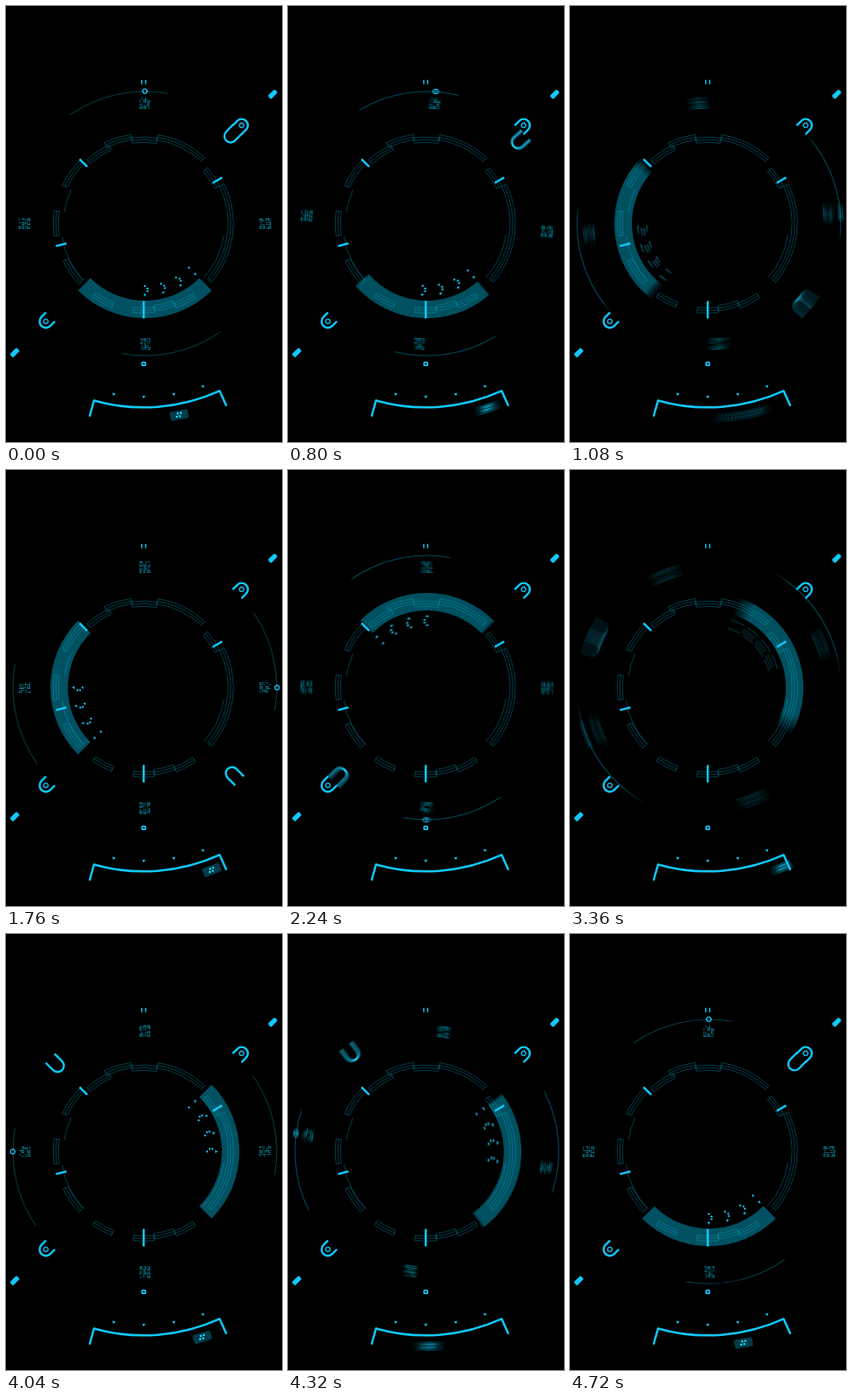
Write an HTML page with a canvas that moves like this. It is 317x500 px and loops after 4.76 s.

```html
<!DOCTYPE html>
<html>
<head>
<meta charset="utf-8">
<style>
  html, body { margin: 0; height: 100%; overflow: hidden; background: #000; }
  canvas { display: block; }
</style>
</head>
<body>
<canvas id="stage" width="317" height="500"></canvas>
<script>
const ctx = document.getElementById('stage').getContext('2d');
const LOOP = 4760, STEP = 40, SHUTTER = 20, SAMPLES = 16;
const BRIGHT = '#10c8fa', DIM = 'rgba(8,190,225,.32)', PANEL = '#025162';
const rad = deg => deg * Math.PI / 180;

// Each turn moves the dial a quarter; sweep is how far the lower badges travel.
const turns = [
  { start: 567, sweep: -190 },
  { start: 1704, sweep: 160.5 },
  { start: 2880, sweep: 22.5 },
  { start: 4040, sweep: 187 }
];

// Ring plates: from angle, to angle, outer radius.
const plates = [
  [244, 262, 103], [262, 279, 99], [279, 313, 103], [228, 246, 98], [205, 225, 103],
  [172, 188, 104], [137, 155, 102], [111, 125, 103], [83, 97, 103], [69, 83, 101],
  [55, 69, 104], [-41, -26, 97], [-26, 41, 103]
];

// Slow quartic build-up, then a damped spring that overshoots and settles.
function swing(ms) {
  if (ms < 470) return .7 * (Math.max(0, ms) / 470) ** 4;
  const u = .03 * (ms - 470);
  return 1 - Math.exp(-u) * (.3 * Math.cos(u) + .1 * Math.sin(u));
}

function pose(t) {
  let dial = 0, badge = 79.5;
  for (const { start, sweep } of turns) {
    const p = swing(t - start);
    dial += 90 * p;
    badge += sweep * p;
  }
  return { dial, badge };
}

// Draws in a frame whose x axis points outward at the given angle.
function at(deg, radius, draw) {
  ctx.save();
  ctx.rotate(rad(deg));
  ctx.translate(radius, 0);
  draw();
  ctx.restore();
}

function stroke(color, width) {
  ctx.strokeStyle = color;
  ctx.lineWidth = width;
  ctx.stroke();
}

function arc(radius, from, to, color = DIM, width = 1) {
  ctx.beginPath();
  ctx.arc(0, 0, radius, rad(from), rad(to));
  stroke(color, width);
}

function sector(inner, outer, from, to) {
  ctx.beginPath();
  ctx.arc(0, 0, outer, rad(from), rad(to));
  ctx.arc(0, 0, inner, rad(to), rad(from), true);
  ctx.closePath();
}

function box(width, height, corner, color) {
  ctx.fillStyle = color;
  ctx.beginPath();
  ctx.roundRect(-width / 2, -height / 2, width, height, corner);
  ctx.fill();
}

// U shape; side 1 opens outward, -1 inward.
function hook(side, arm) {
  ctx.beginPath();
  ctx.moveTo(side * arm, -7.2);
  ctx.lineTo(0, -7.2);
  ctx.arc(0, 0, 7.2, -Math.PI / 2, Math.PI / 2, side > 0);
  ctx.lineTo(side * arm, 7.2);
  stroke(BRIGHT, 2.4);
}

function pointer(size) {
  ctx.fillStyle = BRIGHT;
  ctx.beginPath();
  ctx.moveTo(size, 0);
  ctx.lineTo(-size * .7, -size);
  ctx.lineTo(-size * .7, size);
  ctx.fill();
}

// Two rows of three seven-segment characters.
function readout(seed) {
  const bar = (x, y, w, h) => {
    seed = seed * 16807 % 2147483647;
    if (seed % 100 < 62) ctx.fillRect(x, y, w, h);
  };
  ctx.fillStyle = 'rgba(12,185,215,.55)';
  for (let i = 0; i < 6; i++) {
    const x = -6 + i % 3 * 4.4, y = -6.3 + (i > 2 ? 7 : 0);
    for (let j = 0; j < 3; j++) bar(x, y + j * 2.5, 3, 1);
    for (let j = 0; j < 4; j++) bar(x + j % 2 * 2.2, y + (j > 1 ? 3 : 0), 1, 2.8);
  }
}

function dots(group) {
  at(90 - group * 15, 0, () => {
    ctx.fillStyle = BRIGHT;
    ctx.fillRect(70.5, -1, 2, 2);
    for (let j = 1; j < 3 && group < 3; j++) ctx.fillRect(70.5 + j * 3, -4, 2, 2);
    ctx.translate(82, 0);
    pointer(1.7);
  });
}

function drawDial(angle) {
  ctx.save();
  ctx.translate(1.3, .2);
  ctx.rotate(rad(angle));
  sector(88.5, 108.5, 45, 135);
  ctx.fillStyle = PANEL;
  ctx.fill();
  arc(151.5, 235.5, 280);
  arc(151.5, 55, 100);
  at(270, 151.8, () => arc(2.6, 0, 360, BRIGHT, 1.3));
  at(-45.5, 140.5, () => hook(1, 12));
  for (let i = 0; i < 4; i++) {
    dots(i);
    at(i * 90, 138.5, () => {
      ctx.rotate(Math.PI / 2);
      readout(4127 + i * 7919);
    });
  }
  ctx.restore();
}

// Two opposite badges, seen only between the prongs of the lower bar.
function drawBadges(angle) {
  ctx.save();
  sector(213, 236, 64.5, 106.5);
  ctx.clip();
  for (const deg of [angle, angle + 180]) {
    at(deg, 223.5, () => {
      ctx.rotate(-Math.PI / 2);
      box(21, 10.4, 2, '#033b49');
      ctx.fillStyle = BRIGHT;
      for (let j = 0; j < 4; j++) ctx.fillRect(-4 + j * 1.8, j % 2 ? -3 : .4, 2, 2);
    });
  }
  ctx.restore();
}

function drawFixed() {
  for (const [from, to, outer] of plates) {
    sector(outer - 6, outer, from, to);
    stroke(DIM, 1);
    arc(outer - 3, from, to);
  }
  arc(92, 188, 205);
  arc(95, 136, 171);
  arc(93, 8, 42);

  for (const deg of [165.5, 225, -30.3]) at(deg, 98, () => box(12.5, 2.5, 0, BRIGHT));
  at(90, 99, () => box(20, 2.5, 0, BRIGHT));

  for (const deg of [-45, 135]) {
    at(deg, 159, () => {
      hook(-1, 7.5);
      arc(2.6, 0, 360, BRIGHT, 1.3);
    });
    at(deg, 209.5, () => box(11, 5.4, 1.5, BRIGHT));
  }

  // Lower bar: the arc with a prong at each end.
  arc(211, 65.6, 105.7, BRIGHT, 2.5);
  for (const deg of [65.6, 105.7]) at(deg, 220, () => box(20, 2.5, 0, BRIGHT));
  for (const deg of [70, 80, 90, 100]) at(deg, 199, () => pointer(1.9));

  for (const deg of [-89.2, -90.8]) at(deg, 162, () => box(5, 1.4, 0, BRIGHT));
  at(90, 161, () => {
    box(5.2, 5.4, 1, BRIGHT);
    box(1.8, 2.3, 0, '#000');
  });
}

function render() {
  const t = Math.floor(performance.now() % LOOP / STEP) * STEP;
  const travel = pose(t + SHUTTER / 2).dial - pose(t - SHUTTER / 2).dial;
  const count = Math.abs(travel) > .05 ? SAMPLES : 1;
  ctx.setTransform(1, 0, 0, 1, 0, 0);
  ctx.fillStyle = '#000';
  ctx.fillRect(0, 0, 317, 500);
  ctx.translate(158.2, 249.3);

  // Motion blur: average several poses across the open shutter.
  ctx.globalCompositeOperation = 'lighter';
  ctx.globalAlpha = 1 / count;
  for (let i = 0; i < count; i++) {
    const { dial, badge } = pose(t + SHUTTER * ((i + .5) / count - .5));
    drawDial(dial);
    drawBadges(badge);
  }
  ctx.globalCompositeOperation = 'source-over';
  ctx.globalAlpha = 1;
  drawFixed();
  requestAnimationFrame(render);
}

render();
</script>
</body>
</html>
```
